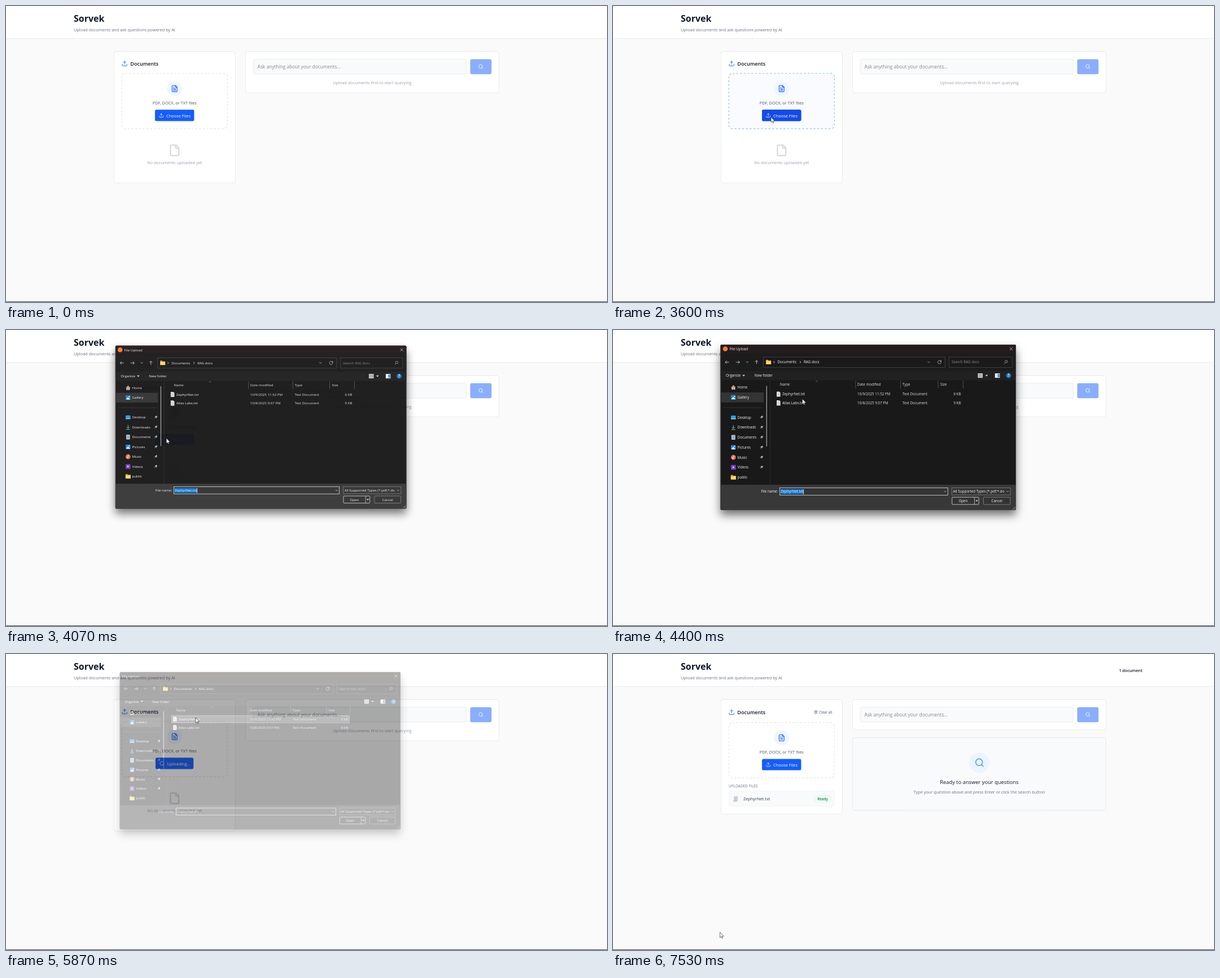
Write an HTML page that moves like this. It is 1065 px wide and 526 px high and loops after 8000 ms.

```html
<!DOCTYPE html>
<html lang="en">
<head>
<meta charset="utf-8">
<title>Document upload</title>
<style>
  html, body { margin: 0; width: 100%; height: 100%; overflow: hidden; background: #fafafa; }
  svg { display: block; width: 1065px; height: 526px; }
  text { font-family: "Open Sans", "Noto Sans", sans-serif; white-space: pre; }
  .card { filter: drop-shadow(0 .6px .7px rgba(0, 0, 0, .13)); }
  .window { filter: drop-shadow(0 9px 8px rgba(0, 0, 0, .55)); }
</style>
</head>
<body>
<svg id="stage" viewBox="0 0 1065 526" xmlns="http://www.w3.org/2000/svg"></svg>
<script>
const LOOP = 8000, FPS = 15;
const BLUE = '#155dfc', MUTED = '#99a1af', LINE = '#e5e7eb';

// ---- drawing helpers ----
const text = (x, y, s, size, fill, more = '') =>
  `<text x="${x}" y="${y}" font-size="${size}" fill="${fill}" ${more}>${s}</text>`;
const mid = (x, y, s, size, fill, more = '') =>
  text(x, y, s, size, fill, 'text-anchor="middle" ' + more);
const box = (x, y, w, h, fill, stroke = 'none', r = 0, more = '') =>
  `<rect x="${x}" y="${y}" width="${w}" height="${h}" rx="${r}" fill="${fill}" stroke="${stroke}" ${more}/>`;
const disc = (x, y, r, fill) => `<circle cx="${x}" cy="${y}" r="${r}" fill="${fill}"/>`;
const line = (d, stroke, w = .8, more = '') =>
  `<path d="${d}" fill="none" stroke="${stroke}" stroke-width="${w}" ${more}/>`;
const shape = (d, fill) => `<path d="${d}" fill="${fill}"/>`;
const group = (id, body, more = '') => `<g id="${id}" ${more}>${body}</g>`;

const PAGE = 'M15 2H6a2 2 0 0 0-2 2v16a2 2 0 0 0 2 2h12a2 2 0 0 0 2-2V7ZM14 2v4a2 2 0 0 0 2 2h4';
const ICONS = {
  upload: 'M12 3v12M17 8l-5-5-5 5M21 15v4a2 2 0 0 1-2 2H5a2 2 0 0 1-2-2v-4',
  file: PAGE,
  fileText: PAGE + 'M10 9H8M16 13H8M16 17H8',
  search: 'M19 11a8 8 0 1 1-16 0a8 8 0 0 1 16 0M21 21l-4.3-4.3',
  trash: 'M3 6h18M19 6v14a2 2 0 0 1-2 2H7a2 2 0 0 1-2-2V6M8 6V4a2 2 0 0 1 2-2h4a2 2 0 0 1 2 2v2M10 11v6M14 11v6',
  spinner: 'M21 12a9 9 0 1 1-6.2-8.56',
  refresh: 'M21 12a9 9 0 1 1-3-6.7L21 8M21 3v5h-5'
};
const icon = (name, cx, cy, size, stroke) =>
  `<g transform="translate(${cx - size / 2} ${cy - size / 2}) scale(${size / 24})">` +
  line(ICONS[name], stroke, 2, 'stroke-linecap="round" stroke-linejoin="round"') + '</g>';

// ---- page ----
const zone = (fill, stroke) =>
  box(205.3, 119.7, 187, 98.4, fill, stroke, 6.5, 'stroke-width="1.15" stroke-dasharray="3.33"');

function page() {
  const header = box(0, 0, 1065, 57.6, '#fff', 'none', 0, 'class="card"') +
    line('M0 57.8H1065', '#e2e4e8', .6) +
    text(120, 28, 'Sorvek', 16, '#101828', 'font-weight="700"') +
    text(120, 44.6, 'Upload documents and ask questions powered by AI', 7.37, '#6a7282');

  const cards =
    box(191.3, 81, 215, 233.4, '#fff', LINE, 4, 'id="docs" class="card" stroke-width=".6"') +
    box(424.6, 81, 449, 73.4, '#fff', LINE, 4, 'id="ask" class="card" stroke-width=".6"') +
    box(438.2, 94.6, 377.6, 26.4, '#f9fafb', LINE, 3, 'stroke-width=".8"') +
    text(445.6, 111.4, 'Ask anything about your documents...', 8.37, '#85878a') +
    box(822.6, 94.4, 37.8, 26.8, '#8aaefd', 'none', 3) +
    icon('search', 841.5, 107.6, 9.6, '#fff');

  const title = group('title', icon('upload', 210.2, 102.2, 11.1, BLUE) +
    text(220.3, 106, 'Documents', 9.04, '#101828', 'font-weight="600"'));

  const choose = group('choose',
    box(264, 184.2, 69.4, 20.2, BLUE, 'none', 2.6) +
    group('press', box(264, 184.2, 69.4, 20.2, '#1447e6', 'none', 2.6)) +
    icon('upload', 275.2, 194.4, 8.9, '#fff') +
    text(284, 197.5, 'Choose Files', 7.4, '#fff'));
  const busy = group('busy',
    box(265, 184.2, 67.2, 20.2, BLUE, 'none', 2.6) +
    group('spin', icon('spinner', 276.3, 194.4, 8.9, '#fff')) +
    text(285.3, 197.5, 'Uploading...', 7.4, '#fff'));

  const drop = group('drop',
    zone('#fff', '#e1e4e8') + group('hover', zone('#f8fbff', '#7cc0fb')) +
    disc(298.8, 146.8, 13.3, '#eff6ff') + icon('fileText', 298.8, 146.8, 13.3, BLUE) +
    mid(298.8, 175.3, 'PDF, DOCX, or TXT files', 7.37, '#4a5565') + choose + busy);

  const empty = group('empty',
    icon('file', 298.8, 256.4, 22.4, '#d1d5dc') +
    mid(298.8, 280.8, 'No documents uploaded yet', 7.37, MUTED) +
    mid(649, 138.8, 'Upload documents first to start querying', 7.37, MUTED));

  const done = group('done',
    text(938, 32.2, '1 document', 7.2, '#101828', 'font-weight="600" text-anchor="end"') +
    icon('trash', 359.5, 103.4, 6.7, '#4a5565') +
    text(365, 106, 'Clear all', 6.3, '#4a5565') +
    text(205, 236.8, 'UPLOADED FILES', 6.3, '#6a7282', 'letter-spacing=".12"') +
    box(205.3, 243.6, 187, 26.8, '#f9fafb', '#f1f3f5', 3, 'stroke-width=".7"') +
    shape('M214 252.5h7.4v9.6h-7.4z', '#d5d9de') +
    line('M215.4 255h4.6M215.4 257h4.6M215.4 259h3', '#a5acb5', .6) +
    shape('M212.8 260.2h6.4v2.2h-6.4z', '#c0c5cc') +
    text(231, 260.2, 'ZephyrNet.txt', 7.37, '#364153') +
    box(356.5, 251.2, 30, 11.8, '#f0fdf4', '#cdf5da', 5.9, 'stroke-width=".6"') +
    mid(371.5, 259.5, 'Ready', 6.3, '#118a3f', 'font-weight="600"') +
    box(424.6, 148.8, 449, 129, '#f9fafb', LINE, 4, 'class="card" stroke-width=".6"') +
    disc(649, 193, 17.8, '#ebf4ff') + icon('search', 649.5, 193, 17.8, '#4398fb') +
    mid(649, 231.4, 'Ready to answer your questions', 9.33, '#101828') +
    mid(649, 248.4, 'Type your question above and press Enter or click the search button', 7.37, '#6a7282'));

  return box(0, 0, 1065, 526, '#fafafa') + header + cards + title + drop + empty + done +
    box(0, 525, 1065, 1, '#4a4a4a');
}

// ---- file dialog ----
const W = '#f4f4f4', SIZE = 6.27;
const label = (x, y, s, fill = W, more = '') => text(x, y + 2.3, s, SIZE, fill, more);
const chevron = (x, y) => line(`M${x - 2} ${y - 1}l2 2l2-2`, '#c8c8c8', .8);
const triangle = (x, y) => shape(`M${x - 2.4} ${y - 1.2}h4.8l-2.4 2.6z`, '#d8d8d8');
const folder = (x, y) => shape(`M${x - 4.5} ${y - 4}h3.4l1 1.2h4.6v6.6h-9z`, '#e9b13c') +
  shape(`M${x - 4.5} ${y - 1.6}h9v5.4h-9z`, '#fbd768');
const picture = (x, y) => box(x - 4.3, y - 4, 8.6, 8, '#2388d8', 'none', 1) +
  shape(`M${x - 3.6} ${y + 3.4}l3.4-4.4l4 4.4z`, '#e6f4ff') + disc(x + 2, y - 1.8, .9, '#fff');
const sheet = (x, y) => shape(`M${x - 3.3} ${y - 4.6}h4.8l1.8 1.8v7.4h-6.6z`, '#e4e4e4') +
  line(`M${x - 2} ${y - 2}h3M${x - 2} ${y}h4M${x - 2} ${y + 2}h4`, '#9a9a9a', .5);

const PLACES = [
  ['Home', 102, (x, y) => shape(`M${x - 3} ${y}h6v4h-6z`, '#e6d3b8') +
    shape(`M${x - 4.5} ${y + .4}l4.5-4.6l4.5 4.6z`, '#d98a5c') + box(x - .9, y + 1.4, 1.8, 2.6, '#3b82c4')],
  ['Gallery', 119.7, picture],
  ['Desktop', 155.2, (x, y) => box(x - 4.3, y - 3.3, 8.6, 6.6, '#2f9be0', 'none', .8) +
    box(x - 4.3, y + 1.8, 8.6, 1.5, '#8fd0f5', 'none', .5)],
  ['Downloads', 173, (x, y) => line(`M${x} ${y - 4}v6M${x - 2.6} ${y - .4}l2.6 2.6l2.6-2.6M${x - 3.4} ${y + 4}h6.8`, '#8fd0b8', .9)],
  ['Documents', 190.8, (x, y) => box(x - 3.4, y - 4.3, 6.8, 8.6, '#b9cbdc', 'none', .8) +
    line(`M${x - 2} ${y - 2}h4M${x - 2} ${y}h4M${x - 2} ${y + 2}h4`, '#4d6f91', .7)],
  ['Pictures', 208.6, picture],
  ['Music', 226.3, (x, y) => disc(x, y, 4.4, '#e0705c') + disc(x - .9, y + 1.4, 1.1, '#fff') +
    line(`M${x} ${y + 1.4}v-4l1.6.8`, '#fff', .7)],
  ['Videos', 244, (x, y) => box(x - 4.3, y - 4.2, 8.6, 8.4, '#7d3fc8', 'none', 1) +
    shape(`M${x - 1.2} ${y - 1.8}l3 1.8l-3 1.8z`, '#fff')],
  ['public', 261.8, folder]
];

const pin = y => `<g transform="translate(263 ${y}) rotate(45)">` +
  shape('M-1.4 -3h2.8v2.6l1 1h-4.8l1-1z', '#b5b5b5') + line('M0 .4v2.8', '#b5b5b5', .6) + '</g>';

const fileRow = (y, name, date, size) => sheet(293.3, y) + label(300, y, name) +
  label(433, y, date, '#dedede') + label(513, y, 'Text Document', '#dedede') +
  label(616.5, y, size, '#dedede', 'text-anchor="end"');

function dialog() {
  const frame = box(190.5, 26, 523.5, 294, '#191919', 'none', 2, 'class="window"') +
    shape('M190.5 41V28q0-2 2-2h519.5q2 0 2 2v13z', '#231b1c') +
    box(190.5, 41, 523.5, 32, '#1c1c1c') + box(190.5, 73, 523.5, 16.5, '#212121') +
    shape('M190.5 275h523.5v43q0 2-2 2h-519.5q-2 0-2-2z', '#383838') +
    box(190.8, 26.3, 522.9, 293.4, 'none', '#484444', 2, 'stroke-width=".6"');

  const bar = group('badge', disc(199, 33.5, 4.3, '#ff7a2c')) +
    group('caption', label(206.5, 33.7, 'File Upload')) +
    line('M703 31l5 5M708 31l-5 5', W, .7) +
    line('M205.5 57.2h-6.6m2.8-2.8l-2.8 2.8l2.8 2.8M217.8 57.2h6.6m-2.8-2.8l2.8 2.8l-2.8 2.8M254.4 60.6v-6.6m-2.8 2.8l2.8-2.8l2.8 2.8', '#dcdcdc', .8) +
    chevron(238, 57) +
    box(266.5, 48, 322, 18.6, '#1a1a1a', '#4b4b4b', 0, 'stroke-width=".7"') +
    folder(275.6, 57) + line('M284.4 55.2l1.8 1.9l-1.8 1.9M331 55.2l1.8 1.9l-1.8 1.9', W, .8) +
    label(291.5, 57, 'Documents') + label(338, 57, 'RAG docs') +
    chevron(559.5, 57) + icon('refresh', 578.5, 57.2, 8, '#dcdcdc') +
    box(595.5, 48, 111.7, 18.6, '#1a1a1a', '#4b4b4b', 0, 'stroke-width=".7"') +
    label(600, 57, 'Search RAG docs', '#8b8b8b') +
    line('M693 60.2l2.2-2.2M699 56.2a2.2 2.2 0 1 1-4.4 0a2.2 2.2 0 0 1 4.4 0', '#bdbdbd', .7);

  const tools = label(200, 81, 'Organize') + triangle(231.6, 81) + label(250.8, 81, 'New folder') +
    box(646.5, 77, 8.6, 8, '#d6d6d6') + line('M647.5 79h6.6M647.5 81h6.6M647.5 83h6.6', '#555', .6) +
    triangle(662, 81) +
    box(676.8, 77, 8.6, 8, '#eee') + box(681.6, 78, 3, 6, '#2b8ad8') +
    disc(701, 81, 4.4, '#1f7fd0') + mid(701, 83.3, '?', 6.2, '#fff', 'font-weight="700"');

  const side = box(191.5, 111, 75.5, 17.6, '#343434') + line('M196 138h68', '#3f3f3f', .7) +
    PLACES.map(([name, y, draw], i) =>
      draw(213.3, y) + label(220.6, y, name) + (i > 1 && i < 8 ? pin(y) : '')).join('') +
    box(271.6, 99, 1.4, 108, '#9c9c9c', 'none', .7) + line('M278.2 90V275', '#363636', .7);

  const columns = [['Name', 295.8], ['Date modified', 433], ['Type', 513], ['Size', 580]];
  const list = columns.map(([s, x]) => label(x, 97, s, '#dedede')).join('') +
    line('M430 90v14M509.6 90v14M576 90v14M620.5 90v14', '#5c5c5c', .8) +
    line('M359 92l2-1.6l2 1.6', '#9a9a9a', .6) +
    group('rowHover', box(287.4, 107.6, 331, 13, '#404040')) +
    group('rowPicked', box(287.4, 107.6, 331, 13, '#515151', '#a8a8a8', 0, 'stroke-width=".8"')) +
    fileRow(114, 'ZephyrNet.txt', '10/9/2025 11:52 PM', '6 KB') +
    fileRow(129.6, 'Atlas Labs.txt', '10/8/2025 9:07 PM', '9 KB');

  const foot = label(262.4, 287, 'File name:') +
    box(295.5, 280.4, 297.8, 13, '#343434', '#e2e2e2', 0, 'stroke-width=".8"') +
    group('marked', box(297, 283, 41, 8.4, '#0f7ad8')) +
    label(297, 287, 'ZephyrNet.txt') +
    group('caret', box(337, 283, .7, 9, '#fff')) + chevron(588.5, 287) +
    box(600.5, 280.4, 103.7, 12.6, '#333', '#8c8c8c', 0, 'stroke-width=".7"') +
    label(602.5, 287, 'All Supported Types (*.pdf;*.do') + chevron(699.3, 287) +
    box(600.8, 297.2, 47.4, 12.8, '#333', '#e0e0e0', 1, 'stroke-width=".8"') +
    line('M640.6 297.2v12.8', '#e0e0e0', .7) + triangle(644.5, 303.7) +
    label(612.4, 303.6, 'Open') +
    box(656.5, 297.2, 47.5, 12.8, '#333', '#9a9a9a', 1, 'stroke-width=".7"') +
    label(680.2, 303.6, 'Cancel', W, 'text-anchor="middle"') +
    line('M708 319l5-5M710.5 319l2.5-2.5', '#a5a5a5', .8);

  return group('dialog', frame + bar + tools + side + list + foot);
}

const pointer = group('cursor',
  group('arrow', '<path d="M0 0V9.4L2.2 7.4L3.6 10.6L5 10L3.6 6.9H6.6Z" fill="#fff" stroke="#111" stroke-width=".6"/>') +
  group('hand', '<path d="M-1.1 1Q0 -.8 1.1 1V5Q2.3 4.2 2.9 5.3Q4.1 4.7 4.6 5.8Q6.1 5.4 6.1 7V9Q6.1 10.6 5.1 12.6H-.3Q-1 11-3.3 8.4Q-3.5 6.6-1.1 8Z" fill="#fff" stroke="#111" stroke-width=".7"/>' +
    line('M1.1 5v2M2.9 5.3v2M4.6 5.8v1.6', '#111', .5)));

const stage = document.getElementById('stage');
stage.innerHTML = page() + dialog() + pointer;
const el = {};
for (const node of stage.querySelectorAll('[id]')) el[node.id] = node;

// ---- motion: each row is [time, values..., easing into the row] ----
const linear = p => p, hold = () => 0;
const smooth = p => p * p * (3 - 2 * p);
const out = p => 1 - (1 - p) ** 2;

const CURSOR = [
  [66, 1058, 521], [867, 308, 211, smooth], [1200, 281.6, 196.4, out], [1866, 280, 197.4, hold],
  [4000, 280, 198, hold], [4400, 335.5, 122.5, smooth], [4600, 336, 113, out],
  [6533, 336, 113], [7333, 209, 472, smooth], [7533, 189.6, 494.6, out]
];
const WINDOW = [ // scale, opacity
  [3999, .943, .78], [4067, .985, .97], [4133, .997, 1], [4200, 1, 1],
  [5733, 1, 1], [5800, .984, .74], [5867, .95, .36], [5920, .93, 0]
];
const HOVER = [[890, 0], [1090, 1], [3560, 1], [3790, 0], [6600, 0], [6800, 1], [6830, 1], [7030, 0]];
const PRESS = [[1000, 0], [1190, 1], [3560, 1], [3790, 0]];

function sample(rows, t, n) {
  let i = rows.findIndex(r => r[0] > t);
  if (i < 0) i = rows.length;
  if (i === 0 || i === rows.length) return rows[i && i - 1].slice(1, n + 1);
  const a = rows[i - 1], b = rows[i], ease = b[n + 1] || linear;
  const p = ease((t - a[0]) / (b[0] - a[0]));
  return Array.from({ length: n }, (_, k) => a[k + 1] + (b[k + 1] - a[k + 1]) * p);
}

const show = (id, on) => el[id].setAttribute('visibility', on ? 'visible' : 'hidden');
const fade = (id, v) => el[id].setAttribute('opacity', v);
const move = (id, s) => el[id].setAttribute('transform', s);
const within = (t, a, b) => t >= a && t < b;

function draw(ms) {
  const t = Math.floor((ms + 4) * FPS / 1000) * 1000 / FPS + .5;

  const done = t >= 6533, uploading = within(t, 5800, 6533);
  el.docs.setAttribute('height', done ? 203.4 : 233.4);
  el.ask.setAttribute('height', done ? 53.4 : 73.4);
  move('title', `translate(0 ${done ? 1.2 : 0})`);
  move('drop', `translate(0 ${done ? 2.2 : 0})`);
  el.empty.style.display = done ? 'none' : '';
  el.done.style.display = done ? '' : 'none';
  el.choose.style.display = uploading ? 'none' : '';
  el.busy.style.display = uploading ? '' : 'none';
  move('spin', `rotate(${(t - 5800) * .36} 276.3 194.4)`);
  fade('hover', sample(HOVER, t, 1)[0]);
  fade('press', sample(PRESS, t, 1)[0]);

  const open = within(t, 3999, 5920);
  el.dialog.style.display = open ? '' : 'none';
  if (open) {
    const [s, a] = sample(WINDOW, t, 2);
    move('dialog', `translate(415 150) scale(${s}) translate(-415 -150)`);
    fade('dialog', a);
    const titled = t < 5666, picked = t >= 5533;
    fade('badge', titled ? 1 : 0);
    move('caption', `translate(${titled ? 0 : -12} 0)`);
    fade('rowHover', within(t, 4466, 5533) ? 1 : 0);
    fade('rowPicked', picked ? 1 : 0);
    fade('marked', picked ? 0 : 1);
    fade('caret', t < 4533 || within(t, 5066, 5533) ? 1 : 0);
  }

  const [x, y] = sample(CURSOR, t, 2);
  const hand = within(t, 1066, 3600);
  show('cursor', t >= 66);
  move('cursor', `translate(${x} ${y})`);
  fade('arrow', hand ? 0 : 1);
  fade('hand', hand ? 1 : 0);
}

const start = performance.now();
function tick() {
  draw((performance.now() - start) % LOOP);
  requestAnimationFrame(tick);
}
tick();
</script>
</body>
</html>
```
